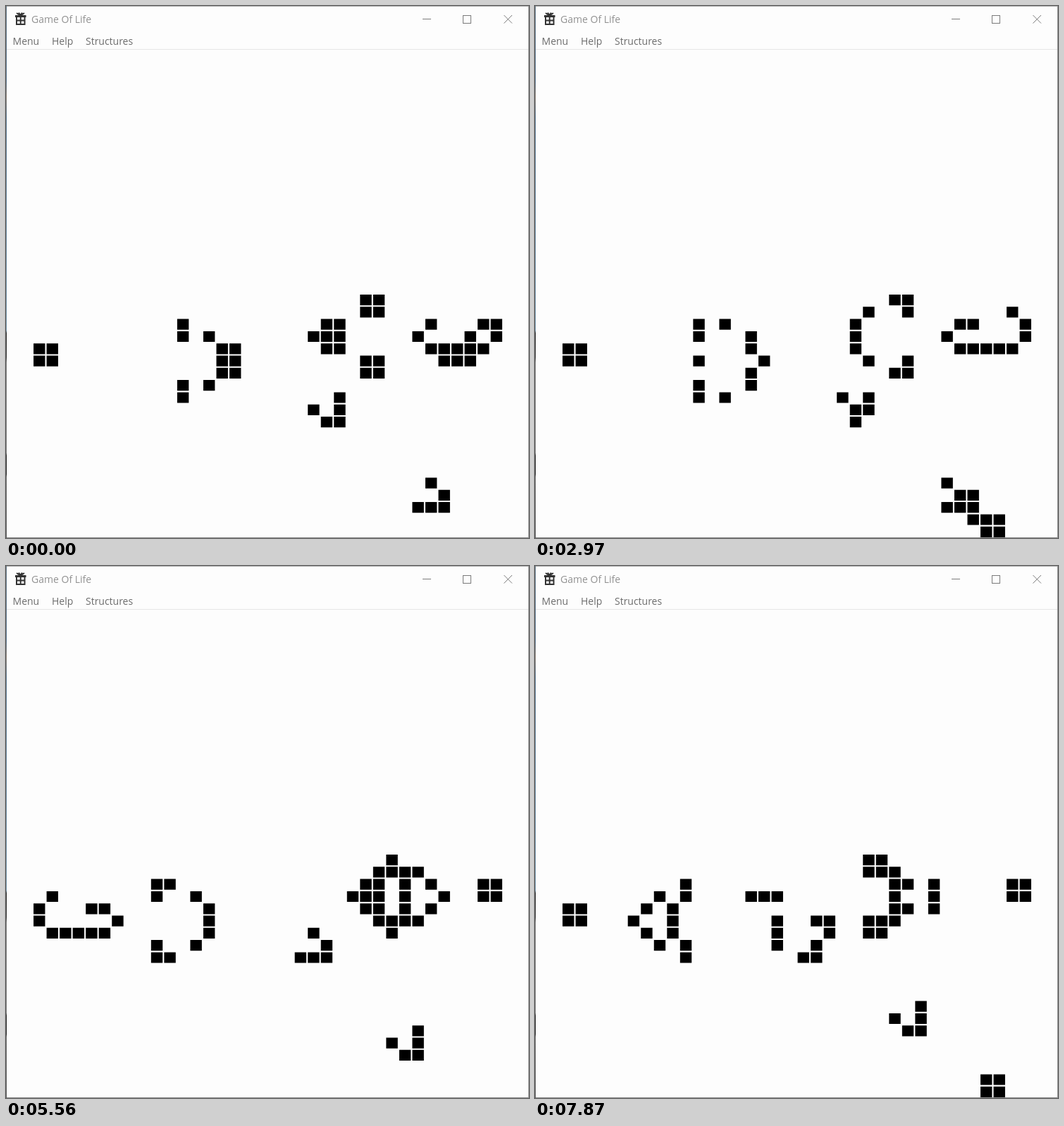
Recreate the animation shown at these times as an HTML page. Size 742 by 754 pixels, loop 7990 ms.

```html
<!DOCTYPE html>
<html lang="en">
<head>
<meta charset="utf-8">
<title>Game Of Life</title>
<style>
  html, body { margin: 0; width: 100%; height: 100%; overflow: hidden; background: #fdfdfd; }
  svg { display: block; }
  text { font: 14px "Open Sans", "Noto Sans", sans-serif; }
</style>
</head>
<body>
<svg width="742" height="754" viewBox="0 0 742 754">
  <defs>
    <linearGradient id="edge" x1="0" y1="0" x2="0" y2="1">
      <stop offset="0" stop-color="#5f7383"/>
      <stop offset=".14" stop-color="#52708a"/>
      <stop offset=".17" stop-color="#8a7c70"/>
      <stop offset=".21" stop-color="#53728c"/>
      <stop offset=".61" stop-color="#6c8da3"/>
      <stop offset=".615" stop-color="#222"/>
      <stop offset=".66" stop-color="#333"/>
      <stop offset=".67" stop-color="#777"/>
      <stop offset=".84" stop-color="#777"/>
      <stop offset=".845" stop-color="#222"/>
      <stop offset=".88" stop-color="#222"/>
      <stop offset=".885" stop-color="#666"/>
      <stop offset="1" stop-color="#555"/>
    </linearGradient>
  </defs>
  <rect width="742" height="754" fill="#fdfdfd"/>
  <path d="M0 61.5H741" stroke="#e6e6e6"/>
  <path d="M0 .5H742" stroke="#b4b4b4"/>
  <path d="M741.5 0V754M0 753.5H742" stroke="#8c8c8c"/>
  <rect width="1" height="754" fill="url(#edge)"/>

  <g fill="none" stroke="#333" stroke-width="2">
    <path d="M15 10L20.5 13.5L26 10M18 9.500L20.500 13L23 9.500"/>
    <path d="M13 14.500H28.500" stroke-width="3"/>
    <path d="M15 15V26H26.500V15M20.700 13V26M15 20.500H26.500"/>
  </g>
  <text x="36" y="24" fill="#929292">Game Of Life</text>
  <g fill="#6c6c6c">
    <text x="9.500" y="55">Menu</text>
    <text x="65" y="55">Help</text>
    <text x="113" y="55">Structures</text>
  </g>
  <g fill="none" stroke="#7c7c7c">
    <path d="M591 18.500H603"/>
    <rect x="648.500" y="13.500" width="11" height="11"/>
    <path d="M706.500 13L718 24.500M718 13L706.500 24.500"/>
  </g>
  <path id="cells"/>
</svg>
<script>
const SIZE = 40, LOOP = 7990;
const path = document.getElementById("cells");

// row: live columns at the start
const seed = {
  20: [27, 28],
  21: [27, 28],
  22: [13, 24, 25, 32, 36, 37],
  23: [13, 15, 23, 24, 25, 31, 35, 37],
  24: [2, 3, 16, 17, 24, 25, 32, 33, 34, 35, 36],
  25: [2, 3, 16, 17, 27, 28, 33, 34, 35],
  26: [16, 17, 27, 28],
  27: [13, 15],
  28: [13, 25],
  29: [23, 25],
  30: [24, 25],
  35: [32],
  36: [33],
  37: [31, 32, 33]
};

// runs of evenly spaced generations: first ms, last ms, count
const runs = [
  [60, 750, 8], [870, 960, 2], [1110, 1150, 2], [1290, 2010, 8],
  [2160, 2430, 4], [2580, 2970, 5], [3060, 3060, 1], [3210, 3590, 5],
  [3740, 4010, 4], [4160, 4160, 1], [4190, 4910, 8], [5050, 5140, 2],
  [5290, 5560, 4], [5710, 5760, 2], [5920, 5980, 2], [6130, 6400, 4],
  [6550, 6600, 2], [6760, 7120, 5], [7270, 7870, 7]
];
const ticks = runs.flatMap(([a, b, n]) =>
  Array.from({ length: n }, (_, i) => n > 1 ? a + (b - a) * i / (n - 1) : a));

const makeGrid = alive => Array.from({ length: SIZE }, (_, r) =>
  Array.from({ length: SIZE }, (_, c) => alive(r, c)));

// cells beyond the border are always dead
function next(grid) {
  return makeGrid((r, c) => {
    let n = 0;
    for (let y = r - 1; y <= r + 1; y++)
      for (let x = c - 1; x <= c + 1; x++)
        if ((y !== r || x !== c) && grid[y]?.[x]) n++;
    return n === 3 || (n === 2 && grid[r][c]);
  });
}

function outline(grid) {
  let d = "";
  grid.forEach((row, r) => row.forEach((on, c) => {
    if (on) d += `M${(2 + c * 18.53).toFixed(2)} ${(63 + r * 17.3).toFixed(2)}h16.4v15.2h-16.4z`;
  }));
  return d;
}

let grid = makeGrid((r, c) => !!seed[r]?.includes(c));
const shapes = [outline(grid)];
for (const _ of ticks) {
  grid = next(grid);
  shapes.push(outline(grid));
}

let shown = -1;
function draw(ms) {
  const t = ms % LOOP;
  const gen = ticks.filter(k => k <= t).length;
  if (gen !== shown) path.setAttribute("d", shapes[shown = gen]);
}

const start = performance.now();
function loop() {
  draw(performance.now() - start);
  requestAnimationFrame(loop);
}
loop();
</script>
</body>
</html>
```
